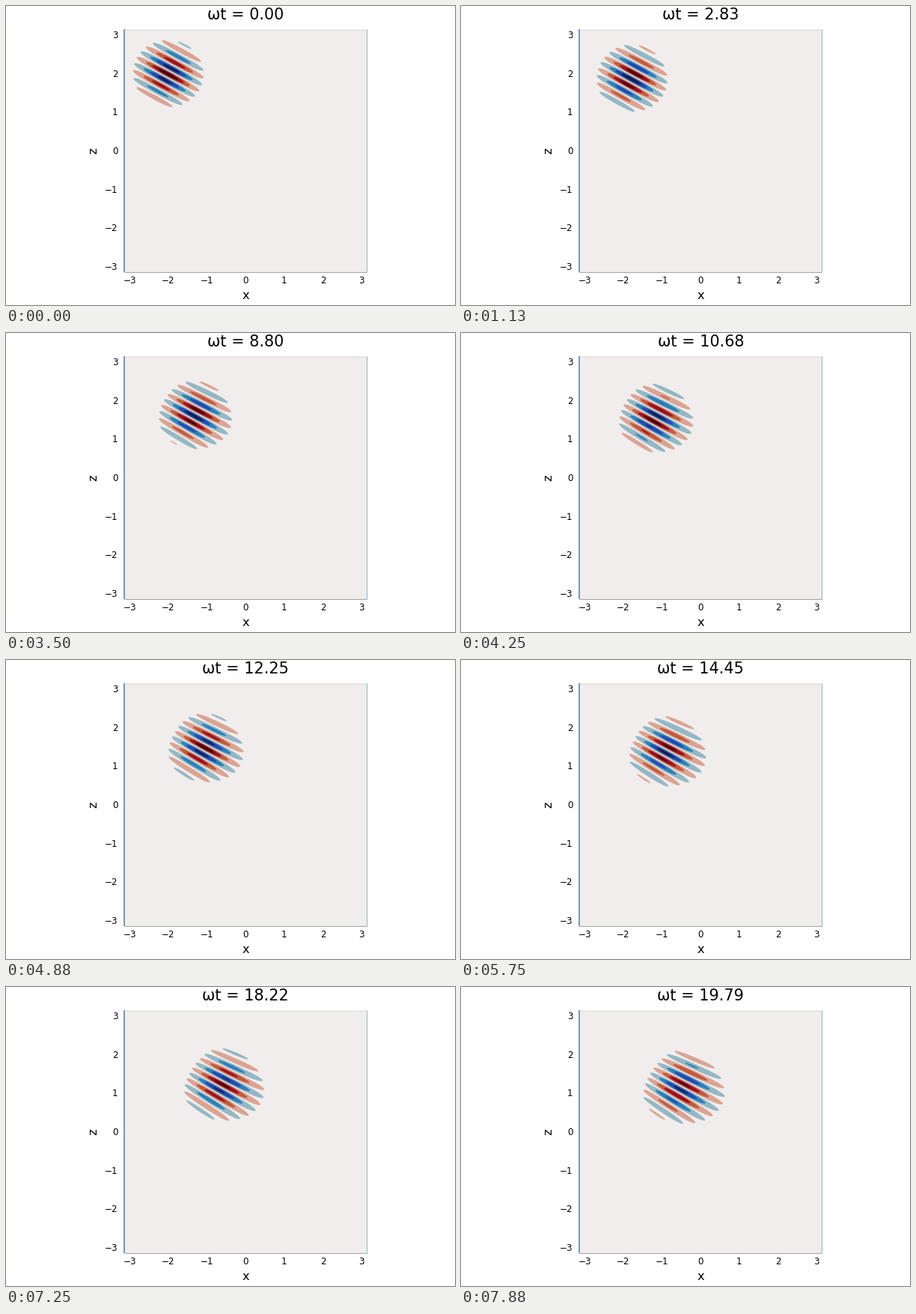
These frames come from a looping animation (600x400 px, 8 s). A matplotlib script:

```python
import numpy as np
import matplotlib.pyplot as plt
from matplotlib.animation import FuncAnimation
from matplotlib.patches import Rectangle

FRAMES, INTERVAL = 64, 125
W, H, DPI = 600, 400, 100
CX, CY, UNIT = 320.2, 193.7, 51.64   # plot centre and pixels per data unit

plt.rcParams["font.family"] = "DejaVu Sans"

# Internal wave packet: stratification N, rotation f, wavenumbers k and m
n, N, f, k, m = 256, 1.0, 0.2, 8, 16
h = 2 * np.pi / n
omega = np.sqrt((N**2 * k**2 + f**2 * m**2) / (k**2 + m**2))
delta = 2 * np.pi / 15

x = -np.pi + (np.arange(n) + 0.5) * h
z = -np.pi + np.arange(n) * h
X, Z = np.meshgrid(x, z)
env = 0.1 * np.exp(-((X + 2)**2 + (Z - 2)**2) / (2 * delta**2))
theta = k * X + m * Z
u0 = env * k * omega / (omega**2 - f**2) * np.cos(theta)
v0 = env * k * f / (omega**2 - f**2) * np.sin(theta)
w0 = env * m * omega / (omega**2 - N**2) * np.cos(theta)
b0 = env * m * N**2 / (omega**2 - N**2) * np.sin(theta)

# Second-order staggered-grid wavenumbers and averaging factors
q = np.fft.fftfreq(n, 1 / n) * h / 2
K, M = np.meshgrid(2 / h * np.sin(q), 2 / h * np.sin(q))
ck, cm = np.meshgrid(np.cos(q), np.cos(q))
kap2 = K**2 + M**2
kap2[0, 0] = 1
Om = np.sqrt((M * f * ck)**2 + (K * N * cm)**2) / np.sqrt(kap2)

# Streamfunction amplitude and its initial rate: u = M s, w = -K s
fft = np.fft.fft2
s0 = (M * fft(u0) - K * fft(w0)) / kap2
ds0 = (M * f * ck * fft(v0) - K * cm * fft(b0)) / kap2


def vertical_velocity(t):
    s = s0 * np.cos(Om * t) + ds0 * t * np.sinc(Om * t / np.pi)
    return np.fft.ifft2(-K * s).real


def rgb(r, g, b):
    return (r / 255, g / 255, b / 255)


REDS = [rgb(219, 164, 148), rgb(195, 90, 60), rgb(151, 14, 38), rgb(60, 9, 18)]
BLUES = [rgb(149, 183, 196), rgb(42, 128, 187), rgb(40, 67, 178), rgb(24, 28, 67)]
LEVELS = [1 / 9, 3 / 9, 5 / 9, 7 / 9]

fig = plt.figure(figsize=(W / DPI, H / DPI), dpi=DPI, facecolor="white")
ax = fig.add_axes([0, 0, 1, 1])
ax.set_xlim(0, W)
ax.set_ylim(H, 0)
ax.axis("off")


def px(v):
    return CX + UNIT * v


def py(v):
    return CY - UNIT * v


def label(x, y, text, size, ha="center", va="baseline", **kw):
    return ax.text(x, y, text, fontsize=size * 72 / DPI, ha=ha, va=va,
                   color="black", **kw)


left, right, top, bottom = px(-np.pi), px(np.pi), py(np.pi), py(-np.pi)
ax.add_patch(Rectangle((left, top), right - left, bottom - top,
                       fc=rgb(240, 237, 236), ec="none", zorder=0))


def edge(xs, ys, color, width):
    ax.plot(xs, ys, color=color, lw=width * 72 / DPI, zorder=5,
            solid_capstyle="butt")


edge([left, right], [top + 0.4] * 2, rgb(222, 224, 222), 1)
edge([left, right], [bottom - 0.2] * 2, rgb(165, 167, 168), 1.1)
edge([right] * 2, [top, bottom], rgb(150, 188, 198), 1.1)
edge([left + 0.1] * 2, [top - 0.6, bottom + 0.4], rgb(80, 122, 170), 1.5)

for v in range(-3, 4):
    text = str(v).replace("-", "\u2212")
    label(px(v), 371.4, text, 11.9)
    label(149.5, py(v) + 4.3, text, 11.9, ha="right")
label(320.3, 391.9, "x", 16.3)
label(116.8, 193.3, "z", 16.3, va="center", rotation=90)
title = label(320.3, 18, "", 20.8)

# The packet stays in the upper left part of the domain
part = np.s_[n // 2:, :n * 5 // 8]
PX, PY = px(X[part]), py(Z[part])
bands = []


def draw(i):
    while bands:
        bands.pop().remove()
    phase = 0.1 * np.pi * i
    title.set_text(f"ωt = {phase:.2f}")
    w = vertical_velocity(phase / omega)[part]
    for field, colors in ((w, REDS), (-w, BLUES)):
        for level, color in zip(LEVELS, colors):
            if field.max() > level:
                bands.append(ax.contourf(PX, PY, field, levels=[level, 9],
                                         colors=[color], antialiased=True,
                                         zorder=2))
    return [title]


anim = FuncAnimation(fig, draw, frames=FRAMES, interval=INTERVAL,
                     repeat=True, repeat_delay=0, blit=False)
plt.show()
```
